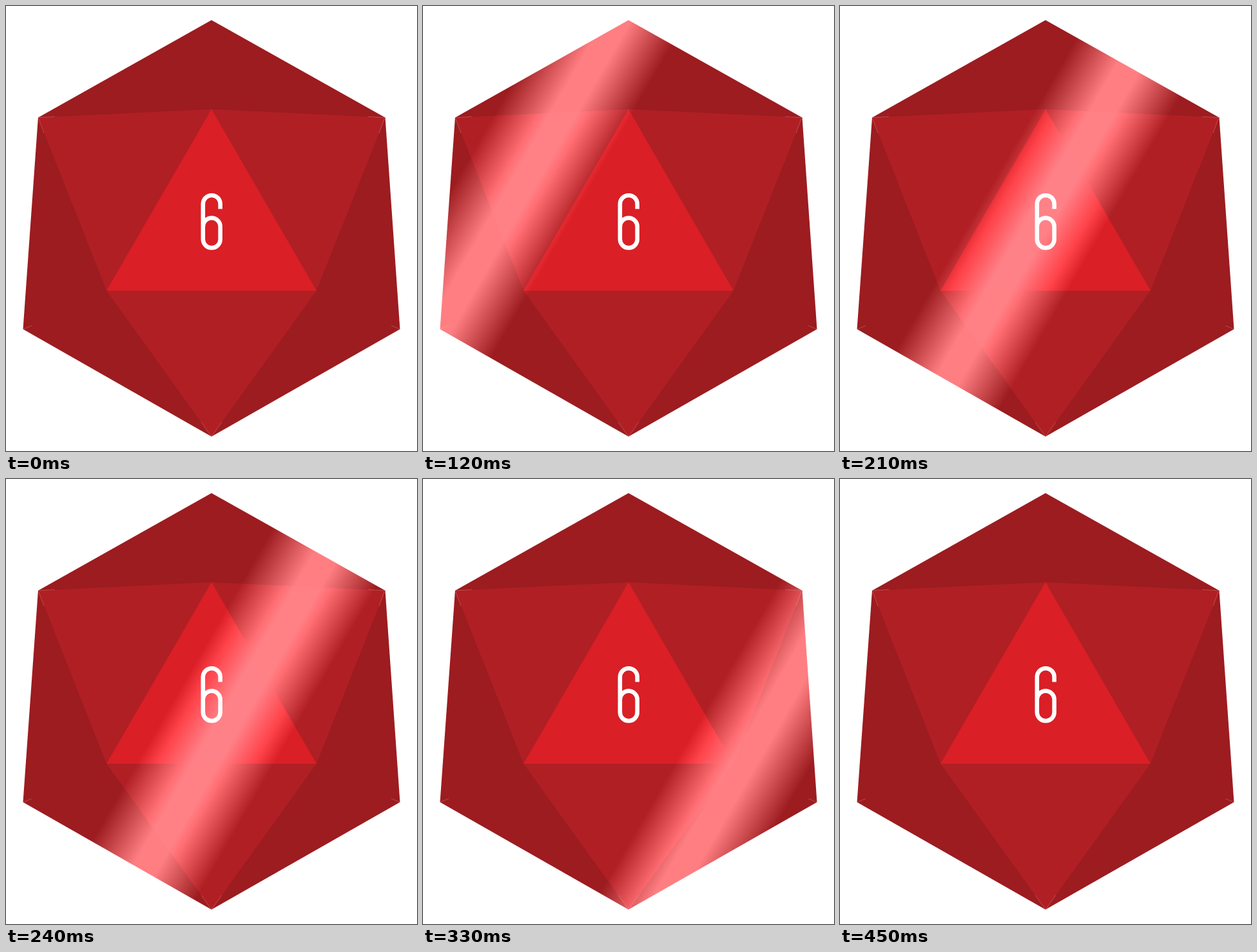
These frames come from a looping animation (640x694 px, 4500 ms). An HTML page with a canvas:

```html
<!DOCTYPE html>
<html lang="en">
<head>
<meta charset="utf-8">
<title>Die with a passing gleam</title>
<style>
  html, body { margin: 0; width: 100%; height: 100%; overflow: hidden; background: #fff; }
  canvas { display: block; width: 640px; height: 694px; }
</style>
</head>
<body>
<canvas id="stage" width="640" height="694" role="img" aria-label="6"></canvas>
<script type="module">
const ctx = document.getElementById('stage').getContext('2d');

const LOOP = 4500, STEP = 30;
const GLEAM = { from: 30, to: 450, start: 56, speed: 1.813, core: 18, reach: 93, light: 0.385 };

const crown = [320, 22], upRight = [590.5, 174], lowRight = [613.5, 504];
const foot = [320, 671.5], lowLeft = [26.5, 504], upLeft = [50, 174];
const apex = [320, 161], baseLeft = [156.5, 444], baseRight = [483.5, 444];
const outline = [crown, upRight, lowRight, foot, lowLeft, upLeft];

const faces = [
  ['#9c1c20', outline],
  ['#b01f24', [upLeft, apex, upRight, baseRight, foot, baseLeft]],
  ['#da1f26', [apex, baseRight, baseLeft]]
];

// Hairline glints on the left half; the right half mirrors them.
const glints = [
  [upLeft, [76, 172.5]],
  [[51, 176], [59, 198]],
  [lowLeft, [40, 498.5]],
  [foot, [304, 649]]
];

const six = new Path2D(
  'M333.7 316.5V308.7A13.45 13.45 0 0 0 306.8 308.7V363.8' +
  'A13.45 13.45 0 0 0 333.7 363.8V344A13.45 13.45 0 0 0 306.8 344');

function trace(points) {
  ctx.beginPath();
  points.forEach(p => ctx.lineTo(...p));
}

function drawFaces() {
  for (const [color, points] of faces) {
    ctx.fillStyle = color;
    trace(points);
    ctx.fill();
  }
}

// Adds light along a band that leans 30 degrees from the vertical.
function drawGleam(time) {
  if (time < GLEAM.from || time >= GLEAM.to) return;
  const { start, speed, core, reach, light } = GLEAM;
  const centre = start + speed * time;
  const nx = Math.cos(Math.PI / 6), ny = Math.sin(Math.PI / 6);
  const near = centre - reach, far = centre + reach;
  const band = ctx.createLinearGradient(near * nx, near * ny, far * nx, far * ny);
  const edge = (reach - core) / (2 * reach);
  [[0, 0], [edge, light], [1 - edge, light], [1, 0]].forEach(([at, alpha]) =>
    band.addColorStop(at, `rgba(255,255,255,${alpha})`));
  ctx.save();
  ctx.globalCompositeOperation = 'lighter';
  ctx.fillStyle = band;
  trace(outline);
  ctx.fill();
  ctx.restore();
}

function drawGlints() {
  ctx.strokeStyle = 'rgba(255,215,190,0.36)';
  ctx.lineWidth = 0.7;
  for (const line of glints) {
    for (const points of [line, line.map(([x, y]) => [640 - x, y])]) {
      trace(points);
      ctx.stroke();
    }
  }
}

function drawSix() {
  ctx.strokeStyle = '#fff';
  ctx.lineWidth = 6.6;
  ctx.stroke(six);
}

function render(time) {
  ctx.fillStyle = '#fff';
  ctx.fillRect(0, 0, 640, 694);
  drawFaces();
  drawGleam(time);
  drawGlints();
  drawSix();
}

const began = performance.now();
function tick() {
  const time = (performance.now() - began) % LOOP;
  render(Math.floor(time / STEP) * STEP);
  requestAnimationFrame(tick);
}
tick();
</script>
</body>
</html>
```
